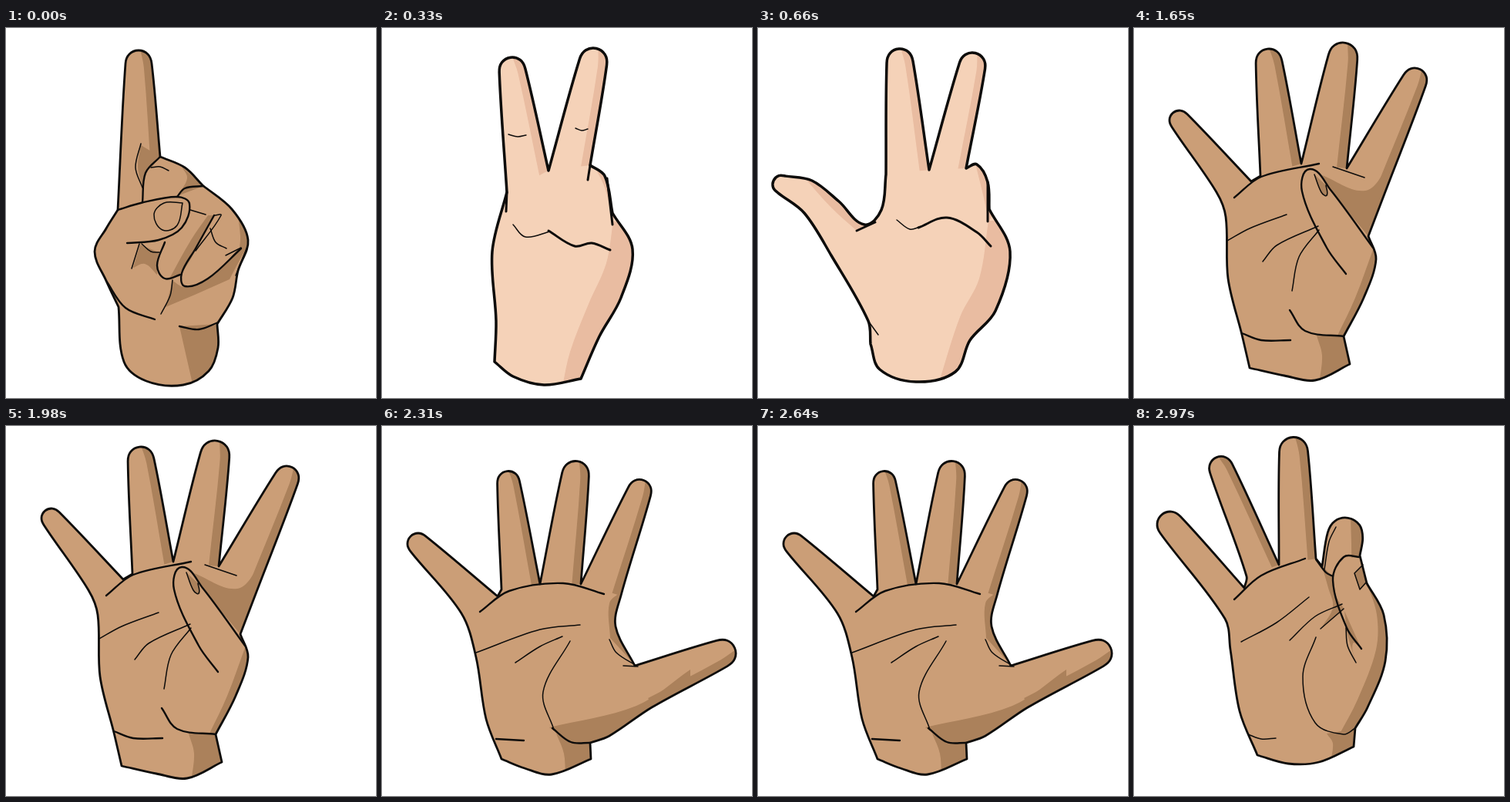
Animation of 480x480 px, one loop 3.3 s. Source, as an HTML page with a canvas:

```html
<!DOCTYPE html>
<html lang="en">
<head>
<meta charset="utf-8">
<title>Counting hand</title>
<style>
html, body { margin: 0; width: 100%; height: 100%; overflow: hidden; background: #fff; }
canvas { display: block; width: 100%; height: 100%; }
</style>
</head>
<body>
<canvas id="stage" width="480" height="480"></canvas>
<script>
const ctx = document.getElementById('stage').getContext('2d');
const LOOP = 3300;
const TAN = { skin: '#cb9e77', shade: '#ab815b', weight: 2.8 };
const PALE = { skin: '#f5d2b8', shade: '#e9bca1', weight: 3.5 };

// Outlines run clockwise. "x,y" is a smooth point, "x,y!" a corner.
// "@x,y,r" is a fingertip between its two base points, shaded on one side; "ox,y,r" is plain.
const poses = [
  {
    start: 0, tone: TAN,
    outline: '146,362! 130,328 115,290 130,260 145,236! @172,46,17 200,167! 232,181 255,204! 293,235 314,275 301,315 294,350 274,384! 275,415 263,445 230,463 182,458 153,433',
    shades: [
      '225,387! 243,466! 285,460! 275,384!',
      '207,362! 245,346 290,326! 301,305! 320,270! 300,236! 304,270 303,286! 262,325 232,336 216,328!',
      '228,180! 235,195 222,218! 256,205!',
      '262,243! 240,275 212,325! 228,318 270,243!',
      '174,281! 165,311! 180,306 196,320! 198,291!',
      '175,152! 171,180 177,206! 182,184 200,167!'
    ],
    bold: [
      '145,236 175,227 222,219 238,228 228,259 198,275 157,279',
      '177,226 181,188 200,167', '222,219 232,208 256,205',
      '206,278 196,308 206,325 226,320',
      '270,243 246,286 228,318 232,335 262,325 305,286',
      '130,328 155,363 193,378', '225,387 250,391 275,382'
    ],
    thin: [
      '229,227 205,227 192,242 203,262 222,256 229,227', '175,150 168,181 177,207', '188,181 200,180 211,185',
      '239,236 259,242', '270,243 279,243 246,289', '265,260 272,278 286,286', '285,295 305,285',
      '173,280 163,312', '176,280 188,290 199,291', '216,327 213,347 201,371', '312,286 298,321'
    ]
  },
  {
    start: 330, tone: PALE,
    outline: '146,433! 148,380 143,290 162,213! @169,55,17 216,185! @274,44,18 270,178! 289,192 299,240! 325,287 310,350 282,400 258,455! 210,463 170,452',
    shades: [
      '300,250! 291,305 268,358 244,420 233,470! 275,470! 345,340! 335,260!',
      '276,180! 290,210 299,252! 305,230! 295,190!'
    ],
    bold: ['162,213 161,238', '270,178 267,197', '292,195 299,255', '216,263 250,283 272,279 296,288'],
    thin: ['164,138 176,141 187,139', '251,130 259,133 267,131', '170,255 186,271 218,264']
  },
  {
    start: 660, tone: PALE,
    outline: '146,410! 143,380 95,295 60,240 o31,203,12 70,198 105,225 138,255 160,236 166,190! @184,44,17 222,184! @278,49,17 270,182! 284,177 298,200 300,235! 327,290 308,367 275,405 256,446 205,459 158,443',
    shades: [
      '299,250! 287,325 262,375 234,462! 275,460! 345,350! 335,250!',
      '282,176! 294,225 299,252! 306,240! 303,185!',
      '60,194! 95,233 128,263! 145,256! 105,215!'
    ],
    bold: ['128,263 152,252', '298,200 298,251', '208,259 245,246 284,265 302,283'],
    thin: ['180,249 197,261 210,258', '143,380 156,398']
  },
  {
    start: 1650, tone: TAN,
    outline: '150,441! 140,398 122,325 119,245 107,213 o59,120,13 152,199! 164,192! @175,44,17 217,176! @271,38,19 276,182! @364,68,16 325,215 304,270! 314,300 298,350 272,400! 280,436! 235,457 195,451',
    shades: [
      '330,180! 300,211 244,191! 257,213 304,270! 330,230!',
      '311,285! 287,350 263,401! 275,402! 325,320!',
      '237,399! 244,425 240,462! 290,450! 273,400!',
      '234,190! 243,213 252,218! 249,204!'
    ],
    bold: [
      '130,220 165,193 240,176',
      '275,319 250,285 218,212 228,183 255,210 310,285',
      '202,366 222,393 272,400', '140,396 165,405 203,405'
    ],
    thin: [
      '258,180 299,194', '121,276 150,260 198,242', '167,303 185,282 239,257', '205,341 214,297 240,262',
      '234,190 243,213 250,217 249,204'
    ]
  },
  {
    start: 2310, tone: TAN,
    outline: '155,432! 135,380 122,300 103,243 o47,153,14 150,221! 155,212! @164,73,14.5 205,205! @251,63,17.5 258,205! @334,85,15.5 310,220 303,260 328,311! @441,295,18 350,365 295,402 270,411! 271,432! 220,452 185,444',
    shades: [
      '310,215! 295,230 296,275! 330,312! 303,260!',
      '400,316! 330,363 217,391! 248,412 300,410! 400,335!',
      '226,399! 236,425 238,456! 280,445! 271,412! 248,411'
    ],
    bold: ['127,241 165,214 235,204 288,218', '221,392 245,410 270,411', '148,406 184,408'],
    thin: [
      '122,294 205,264 257,258', '173,307 205,286 234,273', '244,279 209,345 223,394',
      '295,277 304,294 330,311', '313,311 332,312'
    ]
  },
  {
    start: 2970, tone: TAN,
    outline: '160,427! 137,370 125,290 118,250 o47,128,17 143,210! 146,195 @113,55,15.5 188,180! @207,33,18.5 236,172! 244,182! @274,142,23 293,168! 302,204! 324,245 326,305 303,365 287,392! 285,416! 240,436 200,438',
    shades: [
      '302,203! 315,245 314,290 290,355 266,401! 290,395! 345,300! 320,210!',
      '250,399! 258,412 254,440! 295,425! 287,393!',
      '244,182! 252,210 258,235 243,262! 273,238! 262,220 258,195!',
      '273,240! 277,270 288,307! 284,282 295,289!',
      '297,180! 286,191! 293,212! 302,204!'
    ],
    bold: ['130,225 165,194 222,172', '236,173 249,190 258,195', '295,289 276,262 258,200 272,170 293,170'],
    thin: [
      '262,131 253,150 247,186', '297,180! 286,191! 293,212! 301,203', '139,280 185,255 227,222',
      '202,278 235,247 270,231', '242,263 272,237', '275,262 277,285 288,307',
      '236,274 219,325 235,385 272,400 287,392', '148,400 165,406 184,405'
    ]
  }
];

const mix = (a, b, t) => [a[0] + (b[0] - a[0]) * t, a[1] + (b[1] - a[1]) * t];
const dist = (a, b) => Math.hypot(b[0] - a[0], b[1] - a[1]);

function parse(text) {
  const nodes = text.split(' ').map(word => {
    const [x, y, r] = word.replace(/[@o!]/g, '').split(',').map(Number);
    return { p: [x, y], r, corner: word.endsWith('!'), shaded: word[0] === '@' };
  });
  nodes.forEach((node, i) => {
    if (!node.r) return;
    node.left = nodes[i - 1].p;
    node.right = nodes[i + 1].p;
    const base = mix(node.left, node.right, 0.5);
    const length = dist(base, node.p);
    const [ux, uy] = [(node.p[0] - base[0]) / length, (node.p[1] - base[1]) / length];
    // Position in fingertip radii: across to the right, along towards the tip.
    node.at = (across, along) => [
      node.p[0] + node.r * (ux * along - uy * across),
      node.p[1] + node.r * (uy * along + ux * across)
    ];
  });
  return nodes;
}

function points(nodes) {
  return nodes.flatMap(({ p, r, corner, at }) => {
    if (!r) return corner ? [p, p] : [p];
    return [-2, -1, 0, 1, 2].map(i => at(Math.sin(i * Math.PI / 4), Math.cos(i * Math.PI / 4)));
  });
}

function fingerShade({ at, left, right }) {
  const tip = at(0.1, 1.2), inner = at(0.4, -0.3), base = mix(right, left, 0.22), outer = at(1.5, 0);
  return curve([tip, tip, inner, base, base, right, right, outer, outer], true);
}

// Each tangent follows the chord between neighbours; a doubled point is a corner.
function curve(pts, closed) {
  const n = pts.length;
  const at = i => pts[closed ? (i + n) % n : Math.max(0, Math.min(n - 1, i))];
  const handle = (p, from, to, length) => mix(p, [p[0] + to[0] - from[0], p[1] + to[1] - from[1]], length / (dist(from, to) || 1));
  const path = new Path2D();
  path.moveTo(...pts[0]);
  for (let i = 0; i < (closed ? n : n - 1); i++) {
    const [a, b, c, d] = [at(i - 1), at(i), at(i + 1), at(i + 2)];
    if (b === c) continue;
    const reach = dist(b, c) / 3;
    path.bezierCurveTo(...handle(b, a, c, reach), ...handle(c, d, b, reach), ...c);
  }
  if (closed) path.closePath();
  return path;
}

function build({ start, tone, outline, shades, bold, thin }) {
  const nodes = parse(outline);
  const trace = closed => text => curve(points(parse(text)), closed);
  return {
    start, tone,
    outline: curve(points(nodes), true),
    shades: [...nodes.filter(node => node.shaded).map(fingerShade), ...shades.map(trace(true))],
    bold: bold.map(trace(false)),
    thin: thin.map(trace(false))
  };
}

function stroke(paths, width) {
  ctx.lineWidth = width;
  for (const path of paths) ctx.stroke(path);
}

function draw({ tone, outline, shades, bold, thin }) {
  ctx.fillStyle = '#fff';
  ctx.fillRect(0, 0, 480, 480);
  ctx.fillStyle = tone.skin;
  ctx.fill(outline);
  ctx.save();
  ctx.clip(outline);
  ctx.fillStyle = tone.shade;
  for (const shade of shades) ctx.fill(shade);
  ctx.restore();
  ctx.strokeStyle = '#0d0c0b';
  ctx.lineCap = ctx.lineJoin = 'round';
  stroke([outline], tone.weight);
  stroke(bold, tone.weight * 0.85);
  stroke(thin, 1.5);
}

const hands = poses.map(build);

function frame() {
  const time = performance.now() % LOOP;
  draw(hands.findLast(hand => hand.start <= time));
  requestAnimationFrame(frame);
}
frame();
</script>
</body>
</html>
```
